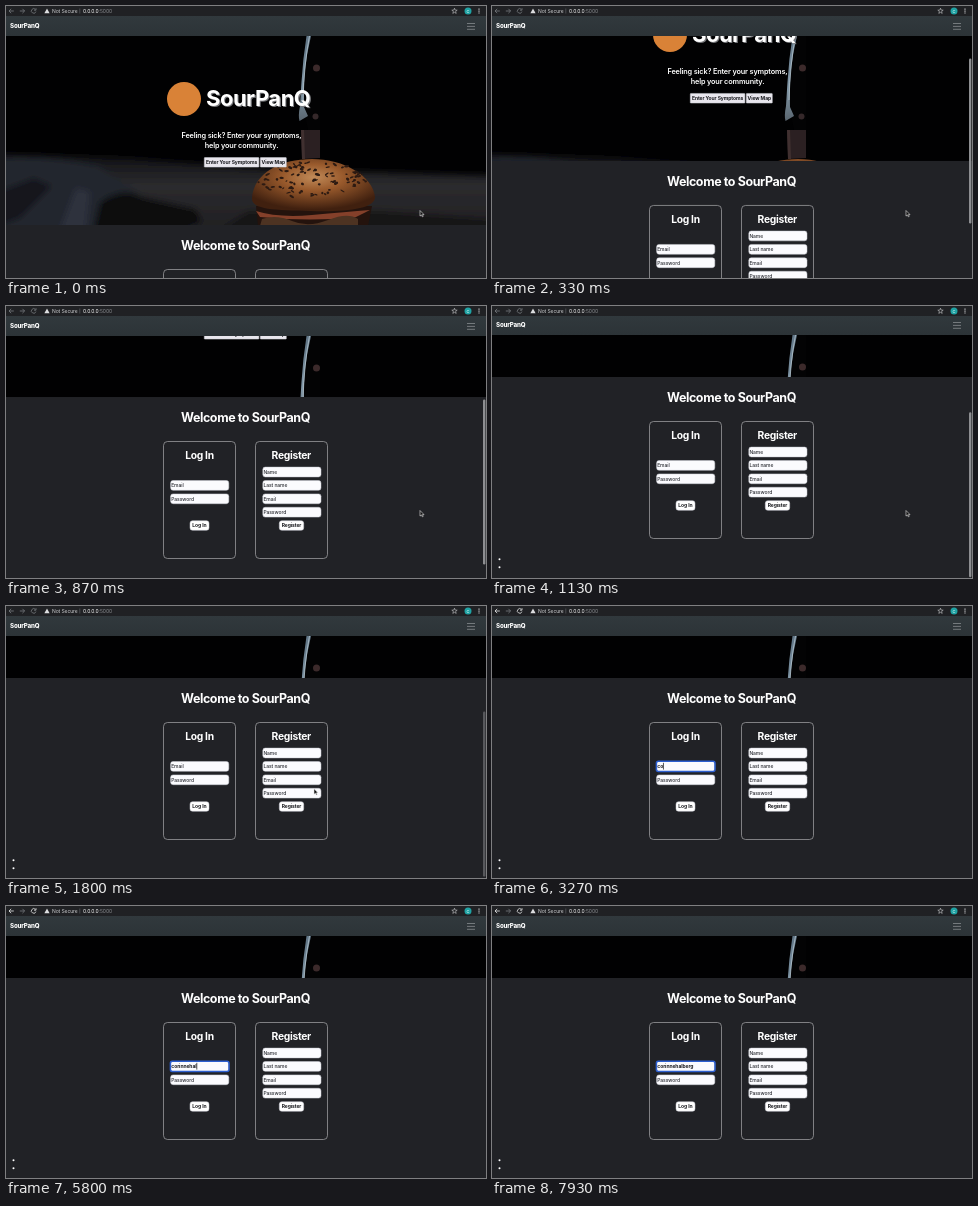
Recreate the animation shown at these times as an HTML page. Size 480x272 px, loop 8 s.

```html
<!DOCTYPE html>
<html lang="en">
<head>
<meta charset="utf-8">
<title>SourPanQ</title>
<style>
html, body { margin: 0; width: 100%; height: 100%; overflow: hidden; background: #212226; }
svg { display: block; width: 480px; height: 272px; }
text { font-family: Inter, "Open Sans", sans-serif; fill: #fff; white-space: pre; }
.b { font-weight: 700; }
.mid { text-anchor: middle; }
.head { font-size: 12.5px; letter-spacing: -.4px; }
.card { font-size: 10.3px; letter-spacing: -.3px; }
.lead { font-size: 7.3px; font-weight: 600; letter-spacing: -.15px; }
.small { font-size: 5px; letter-spacing: -.08px; }
.dark { fill: #17181c; }
.line { fill: none; stroke: #a9aaad; stroke-width: .7; }
.icon { fill: none; stroke: #777a7e; stroke-width: .8; }
</style>
</head>
<body>
<svg viewBox="0 0 480 272">
  <defs>
    <linearGradient id="navFill" x2="0" y2="1">
      <stop stop-color="#31393d"/><stop offset="1" stop-color="#2c3337"/>
    </linearGradient>
    <radialGradient id="bunFill" cx=".5" cy=".35" r=".62">
      <stop stop-color="#c08a58"/><stop offset=".4" stop-color="#995a2c"/><stop offset="1" stop-color="#40200f"/>
    </radialGradient>
    <linearGradient id="table" x2="0" y2="1">
      <stop stop-color="#101013"/><stop offset=".35" stop-color="#2b2b2e"/><stop offset="1" stop-color="#1d1c1e"/>
    </linearGradient>
    <linearGradient id="blade" x2="0" y2="1">
      <stop stop-color="#5f7485"/><stop offset=".6" stop-color="#8399a9"/><stop offset="1" stop-color="#59656f"/>
    </linearGradient>
    <filter id="soft"><feGaussianBlur stdDeviation="3"/></filter>
  </defs>

  <g id="photo">
    <rect width="480" height="272" fill="#010102"/>
    <g filter="url(#soft)">
      <path d="M-20 147L120 152 260 163 500 170V240H-20Z" fill="url(#table)"/>
      <path d="M-20 153Q40 148 92 160L136 190 180 204 205 240H-20Z" fill="#23262f"/>
      <path d="M-20 190L28 172 46 180 14 212-20 225Z" fill="#15171d"/>
      <path d="M84 240L94 196Q118 180 136 191L190 203 196 216 150 240Z" fill="#08090b"/>
      <path d="M48 240L70 182 84 186 78 240Z" fill="#2e323d"/>
      <path d="M190 240L242 205H372L500 214V240Z" fill="#151517"/>
    </g>
    <path d="M302 30Q296 62 295 90L302 124H314V30Z" fill="#030304"/>
    <path d="M300.5 30Q297 52 295.5 76T294 100Q292 110 293.5 115L302 110 298 101Q296 66 305 30Z" fill="url(#blade)"/>
    <path d="M303.5 30Q298 58 297 94" fill="none" stroke="#b4c4cf" stroke-width=".8"/>
    <circle cx="310.5" cy="62" r="3.5" fill="#3c2a2b"/>
    <circle cx="309.5" cy="110.5" r="3" fill="#35282a"/>
    <path d="M250 200H366L362 220H252Z" fill="#24130d"/>
    <path d="M250 205Q272 212 306 209T364 204L350 211Q306 216 254 211Z" fill="#84402a"/>
    <path d="M256 213Q270 208 286 215T322 214T352 213V220H254Z" fill="#4d3322"/>
    <path d="M246 192C248 167 274 153 306 153S367 170 369 191C369 203 340 206 305 205S245 204 246 192Z" fill="url(#bunFill)"/>
    <g id="seeds" fill="#2c1a12"/>
    <path d="M295 124H314V152L296 153Z" fill="#2b2022"/>
    <path d="M295 124H298L299 153H296Z" fill="#403030"/>
  </g>

  <g id="page">
    <circle cx="178" cy="93" r="17" fill="#d98237"/>
    <g class="b" font-size="22" letter-spacing="-.5">
      <text x="201.2" y="101.2" style="fill:#77787c">SourPanQ</text>
      <text x="200" y="100">SourPanQ</text>
    </g>
    <text class="lead mid" x="235.5" y="131.8">Feeling sick? Enter your symptoms,</text>
    <text class="lead mid" x="235.5" y="141.8">help your community.</text>
    <rect y="219" width="480" height="260" fill="#212226"/>
    <text class="head b mid" x="239.5" y="243.7">Welcome to SourPanQ</text>
    <rect class="line" x="157.5" y="263.5" width="72" height="117" rx="4"/>
    <rect class="line" x="249.5" y="263.5" width="72" height="117" rx="4"/>
    <text class="card b mid" x="193.5" y="281">Log In</text>
    <text class="card b mid" x="285.3" y="281">Register</text>
    <g id="form"></g>
    <circle cx="7.5" cy="401.3" r="1" fill="#fff"/>
    <circle cx="7.5" cy="409.3" r="1" fill="#fff"/>
    <rect id="ring" x="164.4" y="302.2" width="58.6" height="10.4" rx="2" fill="none" stroke="#2d5fd0" stroke-width="1.5"/>
    <text id="typed" class="small b dark" x="165.3" y="309.2"></text>
    <path id="caret" d="M0 303.8V310.6" stroke="#111" stroke-width=".7"/>
  </g>

  <g id="nav">
    <rect y="10" width="480" height="20" fill="url(#navFill)"/>
    <text x="4" y="22.4" font-size="6.2" font-weight="800" letter-spacing="-.2">SourPanQ</text>
    <path d="M461 17.5H469M461 20.4H469M461 23.3H469" stroke="#92979a" stroke-width=".7"/>
  </g>

  <rect width="480" height="10" fill="#202124"/>
  <path id="back" class="icon" d="M7.8 5H3M5.2 2.8L3 5 5.2 7.2"/>
  <path class="icon" d="M13.8 5H18.6M16.4 2.8L18.6 5 16.4 7.2"/>
  <path id="reload" class="icon" d="M29.4 3.4A2.3 2.3 0 1 0 29.9 5.6M30 2.2V4.2H28"/>
  <path d="M41 2.5L43.6 7.2H38.4Z" fill="#dcdddf"/>
  <text class="small" x="46" y="6.6" style="fill:#d0d2d4">Not Secure</text>
  <path d="M73.8 2.5V7.5" stroke="#66696d" stroke-width=".6"/>
  <text class="small" x="77" y="6.6">0.0.0.0<tspan fill="#8c8f93">:5000</tspan></text>
  <path d="M448.5 2.2L449.2 4.1 451.2 4.2 449.6 5.5 450.2 7.4 448.5 6.3 446.8 7.4 447.4 5.5 445.8 4.2 447.8 4.1Z" fill="none" stroke="#c8cacc" stroke-width=".6"/>
  <circle cx="462" cy="5" r="3.5" fill="#1fa3a4"/>
  <text class="mid" x="462" y="6.5" font-size="4">C</text>
  <path d="M473 2.6V7.6" stroke="#d0d2d4" stroke-width="1.1" stroke-dasharray="1.1 .85"/>

  <rect id="bar" x="477" width="2.4" height="165" rx="1.2" fill="#8d8e91"/>
  <path id="arrow" d="M0 0V5.6L1.4 4.4 2.3 6.3 3.2 5.9 2.4 4.1H4Z" fill="#111" stroke="#e8e8e8" stroke-width=".6"/>
  <path id="beam" d="M-1.3-3.2H1.3M0-3.2V3.2M-1.3 3.2H1.3" stroke="#333" stroke-width=".7"/>
</svg>
<script>
const LOOP = 8000, STEP = 200 / 3, END = 147, FOCUS = 2270;
const NAME = 'corinnehalberg';
const keys = [3070, 3270, 3600, 3870, 4530, 4870, 5270, 5400, 5670, 5800, 6670, 6870, 7070, 7400];
const scrollPath = [[0, 0], [333, 64], [600, 109], [733, 125], [867, 128], [1000, 145], [1133, 148], [1667, END]];
const el = Object.fromEntries([...document.querySelectorAll('[id]')].map(e => [e.id, e]));

function track(points, t) {
  const i = points.findIndex(p => p[0] > t);
  if (i < 0) return points[points.length - 1][1];
  if (!i) return points[0][1];
  const [t0, a] = points[i - 1], [t1, b] = points[i];
  return a + (b - a) * (t - t0) / (t1 - t0);
}
const show = (e, on) => e.setAttribute('visibility', on ? 'visible' : 'hidden');
const move = (e, x, y) => e.setAttribute('transform', `translate(${x} ${y})`);

// Form controls
const box = (x, y, w, h, r, fill) =>
  `<rect x="${x}" y="${y - h / 2}" width="${w}" height="${h}" rx="${r}" fill="${fill}" stroke="#c9cad2" stroke-width=".5"/>`;
const field = (x, y, label) => box(x, y, 58.2, 9.8, 2.4, '#fbfbfe') +
  `<text class="small dark" x="${x + .6}" y="${y + 1.8}" font-weight="500" style="fill:#2c2e34">${label}</text>`;
const button = (x, y, w, label, r = 2.5, fill = '#fff') => box(x, y, w, 9.6, r, fill) +
  `<text class="small b dark mid" x="${x + w / 2}" y="${y + 1.8}">${label}</text>`;
el.form.innerHTML =
  button(198.3, 156.3, 54.6, 'Enter Your Symptoms', .5, '#e8e6ed') +
  button(254.3, 156.3, 26, 'View Map', .5, '#e8e6ed') +
  field(164.6, 307.4, 'Email') + field(164.6, 320.8, 'Password') +
  ['Name', 'Last name', 'Email', 'Password'].map((s, i) => field(256.8, 294 + i * 13.4, s)).join('') +
  button(184, 347.5, 19, 'Log In') + button(273.3, 347.5, 24.4, 'Register');
const hint = [...el.form.querySelectorAll('text')].find(e => e.textContent === 'Email');

// Seeds scattered over the bun
let seed = 7;
const rnd = () => (seed = seed * 16807 % 2147483647) / 2147483647;
let dots = '';
for (let i = 0; i < 90; i++) {
  const a = rnd() * 6.283, d = Math.sqrt(rnd());
  const x = 306 + 54 * d * Math.cos(a), y = 174 + 18 * d * Math.sin(a);
  dots += `<ellipse cx="${x}" cy="${y}" rx="${1 + rnd() * 1.6}" ry="${.6 + rnd() * .8}" transform="rotate(${rnd() * 80 - 40} ${x} ${y})"/>`;
}
el.seeds.innerHTML = dots;

function draw(t) {
  const held = Math.floor((t + 4) / STEP) * STEP;
  const scroll = track(scrollPath, held), over = Math.max(0, scroll - END);
  move(el.page, 0, -scroll);
  move(el.photo, 0, -over);
  move(el.nav, 0, -over);
  el.bar.setAttribute('y', 11.5 + .64 * scroll);
  el.bar.setAttribute('opacity', t < 70 ? 0 : track([[1667, 1], [1933, 0]], held));

  // Pointer glides to the email field, then hides while typing
  const x = track([[1667, 414], [1933, 202], [2533, 202], [2800, 185]], held);
  const y = track([[1667, 204.5], [1933, 161]], held);
  const onField = held > 1930;
  show(el.arrow, !onField);
  show(el.beam, onField && t < keys[0]);
  move(el.arrow, x, y);
  move(el.beam, x, y);

  const focused = t >= FOCUS, count = keys.filter(k => k <= t).length;
  for (const e of [el.back, el.reload]) e.style.stroke = focused ? '#e6e7e8' : '#777a7e';
  show(el.ring, focused);
  show(hint, !count);
  el.typed.textContent = NAME.slice(0, count);
  const since = t - (count ? keys[count - 1] : FOCUS);
  show(el.caret, focused && Math.floor(since / 500) % 2 === 0);
  move(el.caret, 165.6 + (count ? el.typed.getComputedTextLength() : 0), 0);
}

const start = performance.now();
function tick() {
  draw((performance.now() - start) % LOOP);
  requestAnimationFrame(tick);
}
tick();
</script>
</body>
</html>
```
